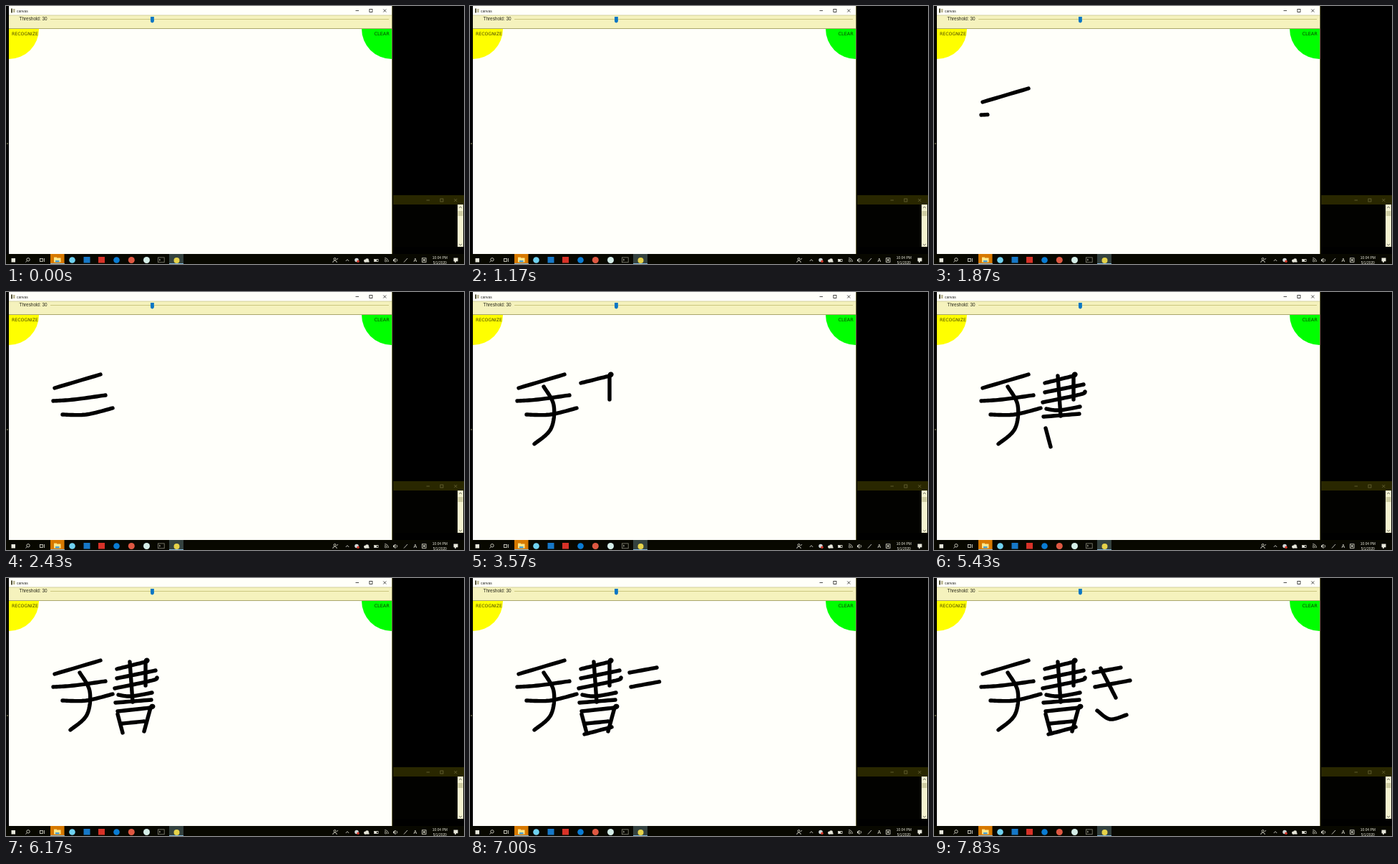
An HTML page with a canvas for the animation above (8 s loop, 640 px wide and 360 px high).

```html
<!DOCTYPE html>
<html lang="en">
<head>
<meta charset="utf-8">
<title>Handwriting canvas</title>
<style>
html, body { margin: 0; width: 100%; height: 100%; overflow: hidden; background: #000; }
canvas { display: block; width: 640px; height: 360px; }
</style>
</head>
<body>
<canvas id="stage" width="640" height="360"></canvas>
<script>
const ctx = document.getElementById('stage').getContext('2d');
const LOOP = 8000;
const SANS = '"Liberation Sans", sans-serif';
const INK = '#e8e8dc';

// Each stroke: start ms, then x, y pairs; a doubled point makes a sharp corner
const hand = [
  [1480, 68,134, 132,115],
  [1840, 66,152, 95,150, 139,144],
  [2170, 79,171, 112,171, 149,162],
  [2620, 103,132, 117,158, 113,191, 90,212]
];
const write = [
  [3240, 155,127, 195,117, 195,117, 195,150],
  [3640, 155,140, 209,129],
  [3950, 152,154, 204,143, 211,139],
  [4240, 173,117, 177,173],
  [4510, 157,163, 175,165, 204,160],
  [4800, 153,174, 203,170],
  [5130, 156,190, 163,216],
  [5480, 156,186, 202,181, 202,181, 193,214],
  [5960, 163,203, 193,200],
  [6240, 160,218, 198,208]
];
const ki = [
  [6540, 223,132, 261,125],
  [6840, 225,152, 274,143],
  [7190, 233,126, 254,167],
  [7600, 228,185, 246,197, 269,191]
];
const strokes = [...hand, ...write, ...ki].map(([start, ...xy]) => {
  const pts = smooth(xy);
  return { start, pts, time: 80 + 2.4 * pts[pts.length - 1].len };
});

// Catmull-Rom samples with running length
function smooth(xy) {
  const n = xy.length / 2;
  const at = (i, k) => xy[2 * Math.max(0, Math.min(n - 1, i)) + k];
  const out = [];
  let len = 0;
  for (let i = 0; i < n - 1; i++) {
    for (let s = 0; s <= 12; s++) {
      const u = s / 12;
      const [x, y] = [0, 1].map(k => {
        const a = at(i - 1, k), b = at(i, k), c = at(i + 1, k), d = at(i + 2, k);
        return b + u * ((c - a) + u * ((2 * a - 5 * b + 4 * c - d) + u * (3 * b - a - 3 * c + d))) / 2;
      });
      const last = out[out.length - 1];
      if (last) len += Math.hypot(x - last.x, y - last.y);
      out.push({ x, y, len });
    }
  }
  return out;
}

function rect(x, y, w, h, color) {
  ctx.fillStyle = color;
  ctx.fillRect(x, y, w, h);
}

function disc(x, y, r, color) {
  ctx.fillStyle = color;
  ctx.beginPath();
  ctx.arc(x, y, r, 0, 7);
  ctx.fill();
}

function line(color, ...xy) {
  ctx.strokeStyle = color;
  ctx.lineWidth = 0.8;
  ctx.beginPath();
  for (let i = 0; i < xy.length; i += 2) ctx.lineTo(xy[i], xy[i + 1]);
  ctx.stroke();
}

function box(x, y, w, h, color) {
  ctx.strokeStyle = color;
  ctx.lineWidth = 0.8;
  ctx.strokeRect(x, y, w, h);
}

function arc(x, y, r, a, b) {
  ctx.strokeStyle = INK;
  ctx.lineWidth = 0.8;
  ctx.beginPath();
  ctx.arc(x, y, r, a, b);
  ctx.stroke();
}

function chevron(x, y, dir, color) {
  line(color, x - 2.2, y + dir, x, y - dir, x + 2.2, y + dir);
}

function label(str, x, y, size, color, align = 'left', font = SANS) {
  ctx.font = size + 'px ' + font;
  ctx.fillStyle = color;
  ctx.textAlign = align;
  ctx.fillText(str, x, y);
}

function corner(x, from, color) {
  ctx.fillStyle = color;
  ctx.beginPath();
  ctx.moveTo(x, 32);
  ctx.arc(x, 32, 42, from, from + Math.PI / 2);
  ctx.fill();
}

function windowButtons(x, y, color) {
  const mid = x + 19.4, end = x + 38.8;
  line(color, x - 2, y, x + 2.5, y);
  box(mid - 2, y - 2, 4, 4, color);
  line(color, end - 2, y - 2, end + 2, y + 2);
  line(color, end + 2, y - 2, end - 2, y + 2);
}

function drawConsole() {
  rect(541, 264, 99, 13, '#292700');
  windowButtons(589.5, 271, '#6b6838');
  rect(541, 277, 90, 59, '#020200');
  rect(631, 277, 8, 59, '#f5f3d0');
  rect(631.5, 286, 7, 7, '#cfcda4');
  chevron(635, 281, 1, '#555');
  chevron(635, 333, -1, '#555');
}

function drawWindow() {
  rect(4, 0, 535.5, 346, '#fffffa');
  rect(7, 3.5, 2, 6, '#55533a');
  rect(10, 4, 2.5, 5, '#b8b490');
  label('canvas', 15, 8.5, 5, '#222');
  windowButtons(490.5, 6.5, '#222');

  rect(4, 13, 535.5, 19, '#f5f2bd');
  rect(4, 12.6, 535.5, 0.8, '#c9c68e');
  rect(4, 31, 535.5, 1, '#aaa66c');
  label('Threshold: 30', 18.5, 20.3, 6.4, '#2a2a1c');
  rect(62, 18, 473, 1, '#cbc680');
  rect(202, 15, 4.8, 6.2, '#0876c4');
  disc(204.4, 21, 2.4, '#0876c4');

  corner(4, 0, '#ffff00');
  corner(539, Math.PI / 2, '#00ff00');
  const wide = '"DejaVu Sans", sans-serif';
  label('RECOGNIZE', 8, 41, 6.2, '#454200', 'left', wide);
  label('CLEAR', 514.5, 41, 6.5, '#064600', 'left', wide);
  rect(539, 0, 1, 346, '#77744a');
}

function drawTaskbar() {
  rect(0, 346, 640, 14, '#080800');
  rect(7.5, 352, 5.5, 5.5, INK);
  arc(31, 353.8, 2.2, 0, 7);
  line(INK, 29.4, 355.4, 27.5, 357.5);
  box(47.5, 352.5, 4, 4, INK);
  line(INK, 53.5, 352, 53.5, 357);

  rect(62, 346, 19.5, 14, '#d77900');
  rect(67, 350.5, 4, 2, '#ffdc70');
  rect(67, 351.5, 9.5, 6, '#ffe88c');
  rect(69, 355, 5.5, 2.5, '#4c9fd0');

  disc(92.5, 354.5, 4.3, '#6fd2f2');
  rect(108.5, 350, 9, 8.5, '#1678c8');
  rect(129, 350, 9, 8.5, '#d83228');
  disc(154.5, 354.5, 4.3, '#0a7cd4');
  disc(175.3, 354.5, 4.5, '#df5842');
  disc(196.5, 354.5, 4.5, '#d5eee8');
  box(212.4, 350.9, 8.8, 6.8, '#88887c');
  line(INK, 214, 353, 215.5, 354.2, 214, 355.4);
  rect(228, 346, 20, 14, '#34423f');
  disc(238.5, 355, 4, '#e6d34a');
  [62, 228].forEach(x => rect(x, 359, 20, 1, '#83b6d8'));
}

function drawTray() {
  arc(459.5, 353, 1.5, 0, 7);
  arc(459.5, 358, 2.8, Math.PI, 0);
  line(INK, 462, 354, 464, 352);
  chevron(477, 354.8, 1.2, INK);
  disc(490, 354.5, 2.8, '#cfd5d4');
  disc(492, 356.3, 1.7, '#dc3a2d');
  disc(502, 355.4, 2, INK);
  disc(504.6, 354.7, 2.4, INK);
  rect(501, 355.5, 6.5, 2, INK);
  box(514.5, 353.5, 5.5, 3, INK);
  rect(515, 354, 3, 2.2, INK);
  [2, 4, 6].forEach(r => arc(528.5, 357.5, r, -1.45, -0.1));
  rect(541, 353.5, 1.6, 2.6, INK);
  line(INK, 542, 354, 544, 352, 544, 357.5, 542, 355.5);
  arc(544, 354.7, 2.6, -0.8, 0.8);
  line(INK, 556, 357.5, 561, 352);
  label('A', 571.8, 357.3, 7, INK, 'center');
  box(581.5, 351.8, 5.5, 5.5, INK);
  disc(584.2, 354.5, 1.3, INK);
  label('10:04 PM', 606.3, 352.6, 4.9, INK, 'center');
  label('5/1/2020', 606.3, 359.6, 4.9, INK, 'center');
  rect(625.5, 351.5, 6, 4.8, INK);
  rect(627, 356, 1.8, 1.8, INK);
}

function drawStroke({ start, pts, time }, t) {
  if (t < start) return;
  const reach = pts[pts.length - 1].len * Math.min(1, (t - start) / time);
  ctx.strokeStyle = '#000';
  ctx.lineWidth = 5.4;
  ctx.lineCap = ctx.lineJoin = 'round';
  ctx.beginPath();
  ctx.moveTo(pts[0].x, pts[0].y);
  ctx.lineTo(pts[0].x, pts[0].y);
  for (let i = 1; i < pts.length; i++) {
    const a = pts[i - 1], b = pts[i];
    if (b.len > reach) {
      const u = (reach - a.len) / (b.len - a.len);
      ctx.lineTo(a.x + (b.x - a.x) * u, a.y + (b.y - a.y) * u);
      break;
    }
    ctx.lineTo(b.x, b.y);
  }
  ctx.stroke();
}

function draw(t) {
  ctx.lineCap = 'butt';
  ctx.lineJoin = 'miter';
  rect(0, 0, 640, 360, '#000');
  rect(1, 191, 2, 2, '#55553c');
  drawConsole();
  drawWindow();
  drawTaskbar();
  drawTray();
  strokes.forEach(s => drawStroke(s, t));
}

const origin = performance.now();
function tick() {
  draw((performance.now() - origin) % LOOP);
  requestAnimationFrame(tick);
}
tick();
</script>
</body>
</html>
```
